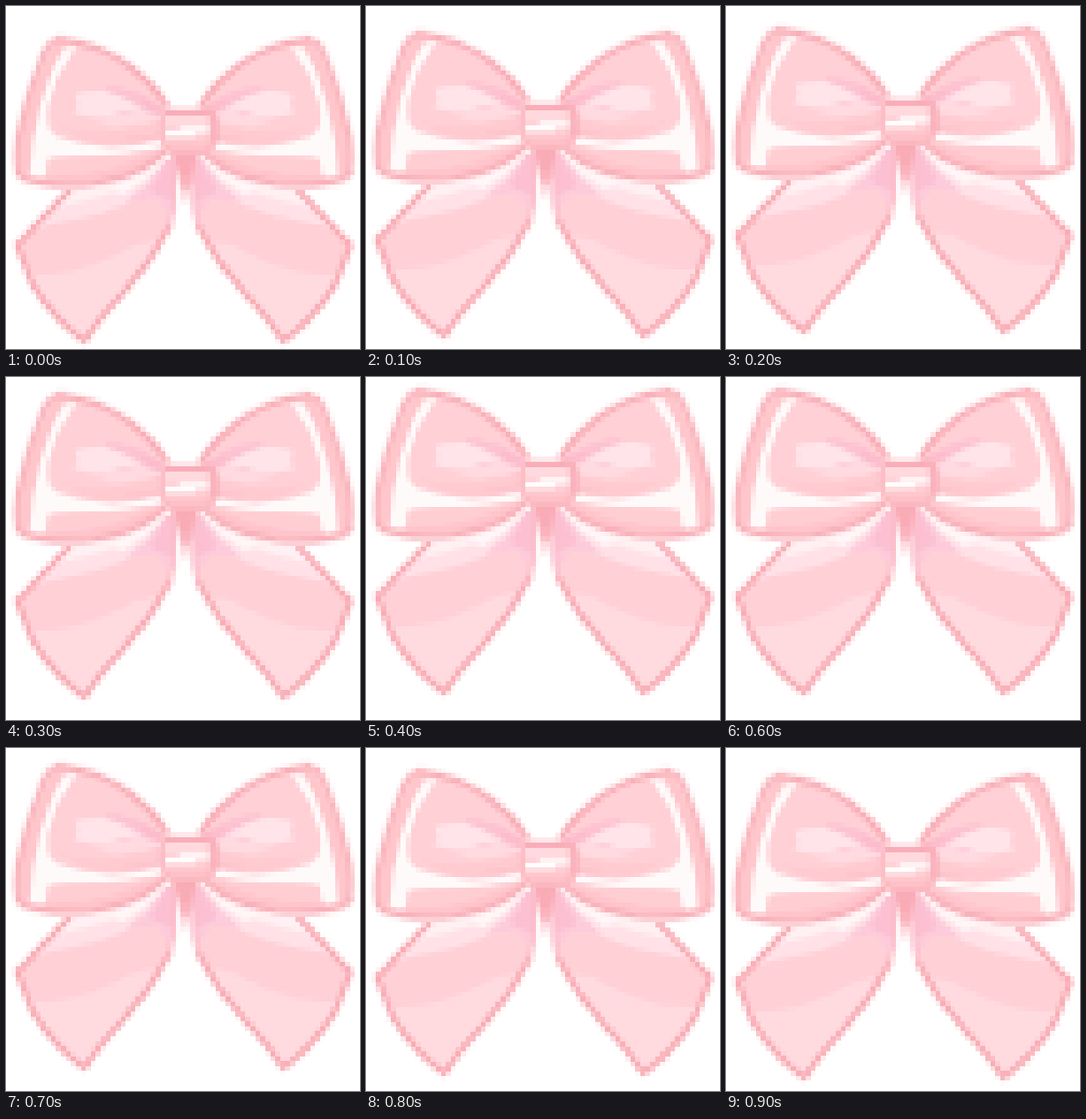
Write an HTML page with a canvas that moves like this. It is 400 px wide and 388 px high and loops after 1000 ms.

```html
<!DOCTYPE html>
<html lang="en">
<head>
<meta charset="utf-8">
<title>Pink bow</title>
<style>
html, body { margin: 0; width: 100%; height: 100%; overflow: hidden; background: #fff; }
canvas { position: absolute; left: 0; top: 0; width: 400px; height: 388px; image-rendering: pixelated; }
</style>
</head>
<body>
<canvas id="bow" width="71" height="69"></canvas>
<script>
const W = 400, H = 388, COLS = 71, ROWS = 69, AXIS = 201;
const canvas = document.getElementById('bow');
const ctx = canvas.getContext('2d');
ctx.lineJoin = ctx.lineCap = 'round';

const fill = (d, color) => {
  ctx.fillStyle = color;
  ctx.fill(new Path2D(d));
};
const stroke = (d, color, width) => {
  ctx.strokeStyle = color;
  ctx.lineWidth = width;
  ctx.stroke(new Path2D(d));
};
const clipped = (d, paint) => {
  ctx.save();
  ctx.clip(new Path2D(d));
  paint();
  ctx.restore();
};

const TAIL_EDGE = 'M74 206 L13 270 L19 286 Q25 311 44 335 Q64 361 88 379 Q105 353 130 327 Q166 287 184 250';
const TAIL = TAIL_EDGE + ' Q190 232 189 206 L194 172 L150 182 Z';
const LOOP = 'M61 38 Q50 39 44 52 Q24 98 14 150 Q11 174 14 189 Q18 198 36 199 ' +
  'Q64 204 98 201 Q142 194 166 176 L182 164 L181 111 Q168 90 140 69 Q104 43 61 38 Z';

function tail() {
  stroke(TAIL, '#fff0f1', 11);
  fill(TAIL, '#ffd0d6');
  clipped(TAIL, () => {
    fill('M20 302 Q62 308 96 294 Q124 284 146 270 L200 262 L90 390 Z', '#ffdbe0');
    fill('M10 274 Q24 250 52 248 Q100 242 140 222 Q164 204 186 168 L80 190 Z', '#ffe1e7');
    fill('M58 228 L82 198 L186 166 Q164 192 132 206 Q96 220 58 228 Z', '#fff0f3');
    fill('M116 206 Q150 194 178 170 L176 178 Q158 200 132 214 Z', '#fff6f8');
    fill('M134 222 Q164 204 180 174 L198 168 L190 238 Q178 232 170 216 Q154 218 134 222 Z', '#fdcbdc');
    fill('M164 210 L184 172 L196 172 L190 222 Z', '#fcc0d2');
  });
  stroke(TAIL_EDGE, '#f9abb4', 6);
  stroke('M184 250 Q190 232 189 206 L190 180', '#fbbcc8', 4.5);
}

function loop() {
  stroke(LOOP, '#ffeeef', 13);
  fill(LOOP, '#ffd0d5');
  clipped(LOOP, () => {
    // turned edge and its bright rim
    fill('M58 34 L74 46 Q48 88 38 132 L32 202 L6 198 L12 140 Z', '#ffc6cb');
    fill('M66 46 L80 46 Q56 76 48 112 Q42 138 58 148 Q84 160 120 160 Q150 159 180 150 ' +
      'L180 160 Q146 166 112 169 Q70 169 50 174 L46 194 L27 192 Q28 150 39 112 Q48 72 66 46 Z', '#fffafa');
    fill('M48 171 Q96 168 138 168 L180 160 Q154 186 118 196 Q80 204 44 196 Z', '#ffced3');
    fill('M42 193 Q92 192 128 181 Q150 173 178 162 L162 190 L94 212 L40 206 Z', '#ffc5cb');

    // upper puff
    fill('M82 48 Q62 72 52 104 Q45 128 60 138 Q84 150 116 148 Q154 146 182 134 L182 108 Q128 48 82 48 Z', '#ffd0d5');
    fill('M62 136 Q96 146 130 140 Q156 136 180 126 L180 148 Q146 157 112 157 Q80 152 62 136 Z', '#ffcbd1');
    fill('M112 92 Q148 92 182 116 L180 132 Q152 128 126 124 Z', '#fdc3d2');
    fill('M78 100 Q92 93 112 96 Q134 102 156 116 Q134 116 118 124 Q94 128 76 121 Q84 112 78 100 Z', '#ffe4ea');
    fill('M96 126 Q124 126 150 116 L180 126 Q150 138 118 136 Z', '#ffdbe1');
    fill('M144 104 Q164 106 180 118 L180 124 Q160 119 144 104 Z', '#fcbccb');
    stroke('M180 144 Q160 150 136 152', '#fdc4cc', 5);
  });
  stroke('M14 189 Q11 174 14 150 Q24 98 44 52 Q50 39 61 38', '#fab5bd', 5.8);
  stroke('M61 38 Q104 43 140 69 Q168 90 181 111', '#f9aeb7', 6);
  stroke('M14 189 Q18 198 36 199 Q64 204 98 201 Q142 194 166 176 L180 164', '#f9b1ba', 6);
}

function knot() {
  const body = 'M184 120 L230 120 Q236 121 236 128 L236 156 Q234 162 226 164 ' +
    'L188 164 Q178 163 177 155 L177 128 Q177 121 184 120 Z';
  fill('M182 162 L222 162 L213 182 L207 212 L199 212 L193 182 Z', '#fbb4be');
  fill('M190 164 L216 164 L207 192 L198 192 Z', '#f9abb6');
  fill('M197 206 L208 206 L206 222 L199 222 Z', '#ffdce1');
  fill(body, '#ffced3');
  clipped(body, () => {
    fill('M170 116 H240 V137 H170 Z', '#ffd9de');
    fill('M178 141 H196 V137 H234 V143 H214 V147 H178 Z', '#fffdfd');
    fill('M170 153 H240 V168 H170 Z', '#ffc5cb');
    fill('M226 120 H240 V166 H226 Z', 'rgba(250,178,188,.25)');
  });
  stroke(body, '#fbb5be', 4.5);
  stroke('M184 120 L230 120 Q236 121 236 128 L236 152', '#f8a9b3', 5.2);
}

function draw() {
  ctx.setTransform(COLS / W, 0, 0, ROWS / H, 0, 0);
  for (const part of [tail, loop]) {
    part();
    ctx.save();
    ctx.translate(2 * AXIS, 0);
    ctx.scale(-1, 1);
    part();
    ctx.restore();
  }
  knot();
}

draw();

// the bow rises five cells and sinks again, one cell per step
const rise = [0, 1, 2, 3, 4, 5, 4, 3, 2, 1, 0];
canvas.animate(
  rise.map((n, i) => ({
    offset: i / 10,
    transform: `translateY(${-Math.round(n * H / ROWS)}px)`,
    easing: 'steps(1, end)'
  })),
  { duration: 1000, iterations: Infinity }
);
</script>
</body>
</html>
```
